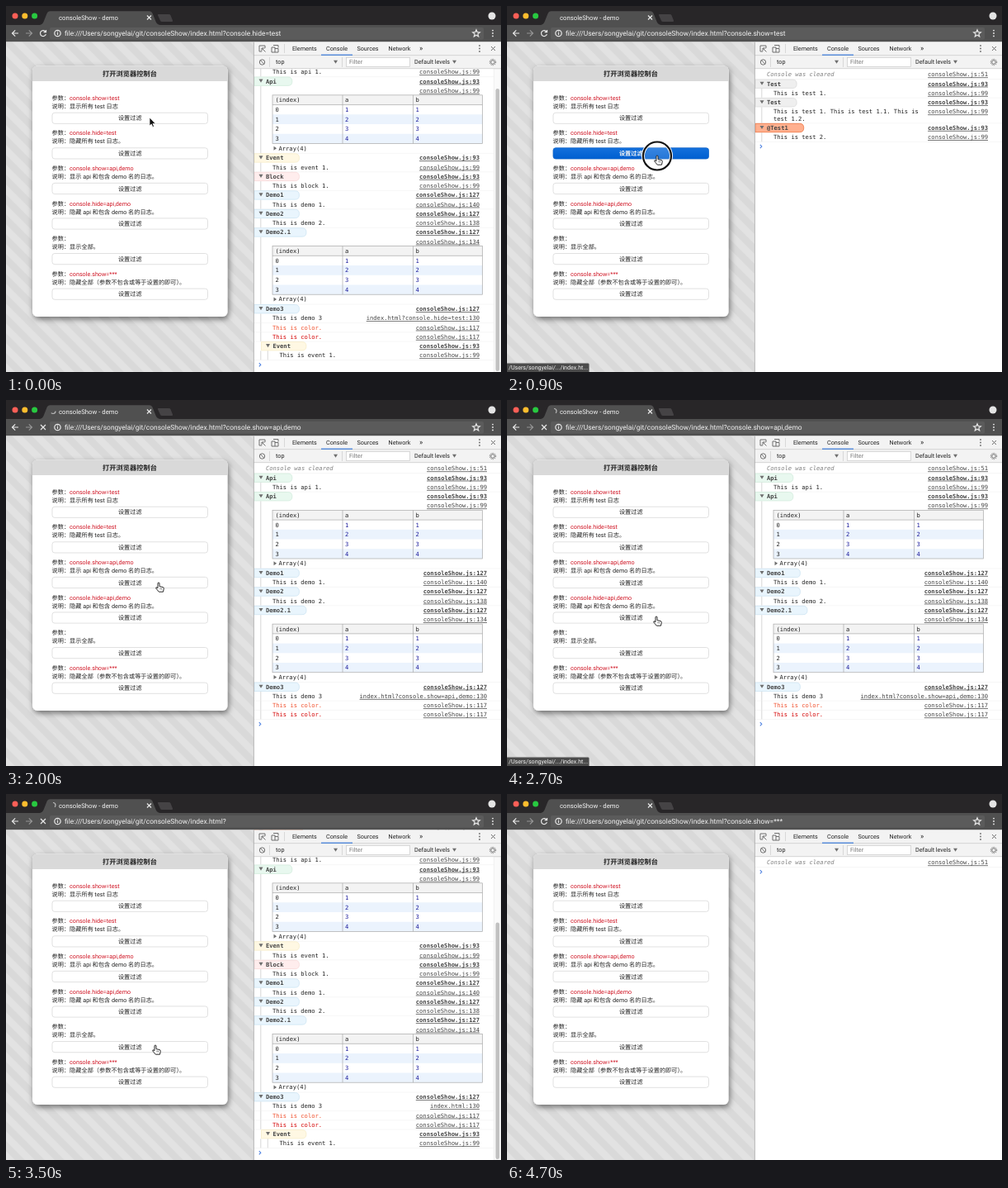
Recreate the animation shown at these times as an HTML page. Size 600 by 443 pixels, loop 4800 ms.

```html
<!DOCTYPE html>
<html lang="zh-CN">
<head>
<meta charset="utf-8">
<title>consoleShow - demo</title>
<style>
  html, body { margin: 0; width: 100%; height: 100%; overflow: hidden; }
  svg { display: block; width: 600px; height: 443px; }
  text { font: 7.2px Roboto, "Noto Sans CJK SC", "Noto Sans CJK", sans-serif; fill: #222; text-rendering: geometricPrecision; white-space: pre; }
  .bold { font-weight: bold; }
  .mid { text-anchor: middle; }
  .light { fill: #f4f4f4; }
  .red { fill: #cf1322; }
  #log text { font: 7.13px "DejaVu Sans Mono", monospace; }
  #log .bold { font-weight: bold; fill: #444; }
  #log .note { font-style: italic; fill: #808080; }
  #log .link { text-anchor: end; text-decoration: underline; fill: #444; }
  #log .num { fill: #1c1c9c; }
  .icon { fill: none; stroke: #e8e8e8; stroke-width: 1.2; }
  .tool { fill: none; stroke: #6e6e6e; stroke-width: 1; }
</style>
</head>
<body>
<svg viewBox="0 0 600 443">
  <defs>
    <pattern id="stripes" width="24" height="24" patternUnits="userSpaceOnUse">
      <path fill="#e2e2e2" d="M0 0h24v24H0z"/>
      <path fill="#d9d9d9" d="M0 0h12l12 12v12zM0 12l12 12H0z"/>
    </pattern>
    <linearGradient id="blue" x2="0" y2="1"><stop stop-color="#1470dc"/><stop offset="1" stop-color="#005fd0"/></linearGradient>
    <filter id="shadow" x="-20%" y="-20%" width="140%" height="140%">
      <feDropShadow dx="1.5" dy="3" stdDeviation="3.5" flood-opacity=".5"/>
    </filter>
  </defs>
  <path fill="#fff" d="M300 43h300v400H300z"/>
  <g id="log"></g>
  <g id="frame"></g>
  <g id="live"></g>
</svg>
<script>
const LOOP = 4800, STEP = 100, ROW = 11.25, TABLE = 81.5, USER = 'songyelai';
const $ = id => document.getElementById(id);
const text = (x, y, s, cls = '', attrs = '') => `<text x="${x}" y="${y}" class="${cls}" ${attrs}>${s}</text>`;
const path = (d, attrs) => `<path d="${d}" ${attrs}/>`;
const rect = (x, y, w, h, attrs) => `<rect x="${x}" y="${y}" width="${w}" height="${h}" ${attrs}/>`;
const dot = (x, y, r, attrs) => `<circle cx="${x}" cy="${y}" r="${r}" ${attrs}/>`;
const icon = d => path(d, 'class="icon"');
const tool = d => path(d, 'class="tool"');

const visits = [
  { hover: 100, press: 100, load: 200, commit: 300, done: 300, button: 0, query: 'show=test' },
  { hover: 800, press: 900, load: 1000, commit: 1000, done: 1100, button: 1, query: 'hide=test' },
  { hover: 1500, press: 1800, load: 1900, commit: 2000, done: 2100, button: 2, query: 'show=api,demo' },
  { hover: 2500, press: 2600, load: 2700, commit: 2800, done: 2900, button: 3, query: 'hide=api,demo' },
  { hover: 3100, press: 3300, load: 3400, commit: 3500, done: 3600, button: 4, query: '' },
  { hover: 4000, press: 4200, load: 4300, commit: 4400, done: 4600, button: 5, query: 'show=***' },
];
const notes = ['显示所有 test 日志', '隐藏所有 test 日志。', '显示 api 和包含 demo 名的日志。',
  '隐藏 api 和包含 demo 名的日志。', '显示全部。', '隐藏全部（参数不包含或等于设置的即可）。'];
const moves = [[0, 174, 135], [400, 174, 135], [700, 183, 178], [900, 182, 181], [1100, 182, 181],
  [1500, 185, 221], [2200, 185, 221], [2500, 181, 262], [2800, 181, 262], [3100, 181, 304],
  [3600, 181, 304], [3800, 178, 347], [4500, 178, 347], [4600, 184, 351], [4800, 184, 351]];

// Each group: filter keys, label, messages as [text, line, colour]
const groups = [
  ['test', 'Test', ['This is test 1.', 99]],
  ['test', 'Test', ['This is test 1. This is test 1.1. This is\ntest 1.2.', 99]],
  ['test', '@Test1', ['This is test 2.', 99]],
  ['api', 'Api', ['This is api 1.', 99]],
  ['api', 'Api', ['table', 99]],
  ['event', 'Event', ['This is event 1.', 99]],
  ['block', 'Block', ['This is block 1.', 99]],
  ['demo', 'Demo1', ['This is demo 1.', 140]],
  ['demo', 'Demo2', ['This is demo 2.', 138]],
  ['demo', 'Demo2.1', ['table', 134]],
  ['demo', 'Demo3', ['This is demo 3', 130], ['This is color.', 117, '#f0502d'], ['This is color.', 117, '#d40000']],
  ['demo event', 'Event', ['This is event 1.', 99]],
];
const tints = {
  test: ['#efefef', '#dcdcdc'], api: ['#e8f8ef', '#d3ecdd'], event: ['#fff8e3', '#f6ecc9'],
  block: ['#ffeded', '#f8dada'], demo: ['#e9f5fd', '#cfe5f3'], '@Test1': ['#ffb08f', '#ee7440'],
};

const buttonTop = i => 129.2 + 42.58 * i;
const button = (i, pressed) =>
  rect(56, buttonTop(i), 188.5, 13.2, `rx="3" fill="${pressed ? 'url(#blue)' : '#fff'}" stroke="${pressed ? '#0a62cc' : '#d4d4d4'}" stroke-width=".7"`) +
  text(150.3, buttonTop(i) + 9.2, '设置过滤', pressed ? 'mid bold light' : 'mid');

function browserBars() {
  const lights = ['#ff5f57', '#ffbd2e', '#28c940'].map((c, i) => dot(11 + 11.8 * i, 12, 3.5, `fill="${c}"`)).join('');
  const menu = (x, y, gap, fill) => [-1, 0, 1].map(i => dot(x, y + i * gap, .9, `fill="${fill}"`)).join('');
  return rect(0, 0, 600, 23, 'fill="#282628"') + rect(0, 23, 600, 20.5, 'fill="#505050"') + lights +
    path('M40 23.2q4-.5 5.500-4l4-10q1.200-3 4-3h120q3 0 4.200 3l4 10q1.500 3.500 6 4z', 'fill="#505050"') +
    path('M184.500 10h13q1.500 0 2 1.200l2.500 6.300q.5 1.500-1 1.500h-12q-1.500 0-2-1.200l-3-6.500q-.4-1.200.5-1.300z', 'fill="#454345"') +
    text(64, 16.6, 'consoleShow - demo', 'light', 'style="font-size:7.76px"') +
    icon('M171 11.500l5 5m0-5l-5 5') + dot(589, 12, 4.5, 'fill="#e4e4e4"') +
    rect(53, 26, 526, 14.5, 'rx="2" fill="#5b5b5b"') +
    icon('M15 33H7.500m3.700-3.700L7.500 33l3.700 3.700') +
    path('M24 33h7.500m-3.700-3.700l3.700 3.700-3.700 3.700', 'class="icon" opacity=".45"') +
    dot(62.5, 33, 3.7, 'class="icon" stroke-width="1"') + icon('M62.500 32.300v2.800m0-4.700v1') +
    icon('M570 28.800l1.200 2.900 3.100.2-2.400 2 .8 3.100-2.700-1.700-2.700 1.700.8-3.100-2.400-2 3.100-.2z') +
    menu(590, 33, 3.4, '#eee');
}

function demoPage() {
  const items = notes.map((note, i) => {
    const y = 113.8 + 42.58 * i, { query } = visits[i];
    return text(55.5, y, `参数：<tspan class="red">${query && 'console.' + query}</tspan>`) +
      text(55.5, y + 10, '说明：' + note) + button(i);
  }).join('');
  return rect(0, 43.5, 300, 399.5, 'fill="url(#stripes)"') +
    rect(32, 72.5, 236.5, 303.5, 'rx="6" fill="#fff" filter="url(#shadow)"') +
    path('M32 91V78.500q0-6 6-6h224.500q6 0 6 6V91z', 'fill="#d9d9d9"') +
    text(150, 85.4, '打开浏览器控制台', 'mid bold', 'style="font-size:8.25px"') + items;
}

function toolsBars() {
  const tabs = [[347, 'Elements'], [388, 'Console'], [425.5, 'Sources'], [463.5, 'Network']];
  const teeth = 'class="tool" stroke-width="1.300" stroke-dasharray="1.200 1.160"';
  return rect(300, 43.5, 300, 32.3, 'fill="#f3f3f3"') +
    path('M300 59.700h300M300 75.700h300', 'stroke="#ccc" stroke-width=".8"') +
    path('M300.400 43.500V443', 'stroke="#a8a8a8" stroke-width=".8"') +
    tabs.map(([x, s]) => text(x, 54.1, s)).join('') + rect(382, 58.6, 38, 1.2, 'fill="#3879d9"') +
    tool('M310 55h-3v-7h7v3M310 51l4.500 4.500M310 51v3.500m0-3.500h3.500') +
    tool('M324 47.500h6v3M322 50h4v6h-4zM326 56h4v-4.500h-4') +
    path('M337.500 46v11M319.500 62v12M407.500 62v12', 'stroke="#ccc" stroke-width=".7"') +
    text(501, 54, '»', '', 'style="font-size:9px"') +
    [48, 51.5, 55].map(y => dot(574, y, .9, 'fill="#6e6e6e"')).join('') + tool('M588 49l5 5m0-5l-5 5') +
    dot(310.5, 68, 3.2, 'class="tool"') + tool('M308.300 65.700l4.500 4.500') +
    text(327, 70.3, 'top') + path('M397 65.800h5l-2.500 4z', 'fill="#6e6e6e"') +
    rect(412.5, 62.3, 77, 11, 'fill="#fff" stroke="#c8c8c8" stroke-width=".7"') +
    text(416, 70.3, 'Filter', '', 'style="fill:#777"') +
    text(495, 70.3, 'Default levels') + path('M541 65.800h5l-2.500 4z', 'fill="#6e6e6e"') +
    dot(590, 68, 2.3, 'class="tool" stroke-width="1.500"') + dot(590, 68, 3.7, teeth);
}

function table(top) {
  const h = 11.72, line = 'stroke="#aaa" stroke-width=".7" fill="none"';
  const cells = (y, values, cls) => [326.5, 411, 496.5].map((x, i) => text(x, y + 8.4, values[i], i ? cls : '')).join('');
  let out = rect(323, top, 254.5, h, 'fill="#f3f3f3"') + cells(top, ['(index)', 'a', 'b'], '');
  for (let i = 0; i < 4; i++) {
    const y = top + h * (i + 1);
    if (i % 2) out += rect(323, y, 254.5, h, 'fill="#ebf3fd"');
    out += cells(y, [i, i + 1, i + 1], 'num');
  }
  return out + rect(323, top, 254.5, h * 5, line) + path(`M323 ${top + h}h254.500M408 ${top}v${h * 5}M493.500 ${top}v${h * 5}`, line) +
    path(`M324.500 ${top + 61.800}v5l3.600-2.500z`, 'fill="#6e6e6e"') + text(330.5, top + 66.8, 'Array(4)');
}

function visibleGroups(query) {
  const [mode, names = ''] = query.split('='), wanted = names.split(',');
  return groups.filter(([keys]) => !mode || (mode === 'show'
    ? keys.split(' ').every(k => wanted.includes(k))
    : !keys.split(' ').some(k => wanted.includes(k))));
}
const messageHeight = s => s === 'table' ? TABLE : s.includes('\n') ? 19.5 : ROW;

function consoleLog(query) {
  const shown = visibleGroups(query);
  const end = 77.4 + ROW + shown.reduce((sum, [, , ...msgs]) => sum + ROW + msgs.reduce((s, m) => s + messageHeight(m[0]), 0), 0);
  const shift = Math.min(0, 428.6 - end), right = shift ? 574 : 583;
  const page = 'index.html' + (query && '?console.' + query);
  const link = (y, line, cls = '') => text(right, y + 8, (line === 130 ? page : 'consoleShow.js') + ':' + line, 'link ' + cls);
  const rule = y => path(`M300 ${y}H${shift ? 591 : 600}`, 'stroke="#f0f0f0" stroke-width=".6"');
  let y = 77.4 + shift;
  let out = text(315, y + 8, 'Console was cleared', 'note') + link(y, 51) + rule(y + ROW);
  y += ROW;
  for (const [keys, label, ...messages] of shown) {
    const path2 = keys.split(' '), indent = 8.5 * (path2.length - 1);
    const [fill, edge] = tints[label] || tints[path2.at(-1)];
    const tip = 334 + indent + label.length * 4.29;
    const markers = h => [0, 8.5].filter(x => x <= indent).map(x => path(`M${308.800 + x} ${y}v${h}`, 'stroke="#c8c8c8" stroke-width=".7"')).join('');
    out += path(`M${301 + indent} ${y + .4}H${tip - 5}q5 0 5 5.200t-5 5.200H${301 + indent}z`, `fill="${fill}" stroke="${edge}" stroke-width=".8"`) +
      path(`M${306.500 + indent} ${y + 3}h5l-2.500 4.200z`, 'fill="#6e6e6e"') +
      text(315 + indent, y + 8, label, 'bold') + link(y, path2[0] === 'demo' && !indent ? 127 : 93, 'bold');
    y += ROW;
    for (const [s, line, color = '#222'] of messages) {
      const h = messageHeight(s);
      out += markers(h) + link(y, line) + rule(y + h);
      out += s === 'table' ? table(y + 11) : s.split('\n').map((part, i) =>
        text(323 + indent, y + 8 + 8.6 * i, part, '', `style="fill:${color}"`)).join('');
      y += h;
    }
  }
  out += path(`M306.800 ${y + 3.400}l2 2.200-2 2.200`, 'fill="none" stroke="#4a7fe0" stroke-width="1.100"');
  if (shift) {
    const view = 367, thumb = view * view / (view - shift);
    out += rect(591.5, 76, 8.5, view, 'fill="#fafafa" stroke="#e8e8e8" stroke-width=".6"') +
      rect(593.5, 443 - thumb, 4.6, thumb - 1, 'rx="2.300" fill="#c1c1c1"');
  }
  return out;
}

function pointerAt(t) {
  const i = moves.findIndex(m => m[0] > t), [t0, x0, y0] = moves[i - 1], [t1, x1, y1] = moves[i];
  const p = (t - t0) / (t1 - t0), e = p * p * (3 - 2 * p);
  return [x0 + (x1 - x0) * e, y0 + (y1 - y0) * e];
}

function pointer(t, pressed) {
  const [x, y] = pointerAt(t);
  const onButton = t > 0 && notes.some((_, i) => y >= buttonTop(i) && y <= buttonTop(i) + 13.2);
  const shape = onButton
    ? path('M-1 1a1 1 0 0 1 2 0v3.600l4 .9q1.500.4 1.300 1.900l-.8 3.800H.3L-3 7.200q-.8-1.700.9-1.400l1.100.9z', 'fill="#fff" stroke="#111" stroke-width=".9"') +
      path('M2 6.500v1.800m1.700-1.500v1.600', 'stroke="#111" stroke-width=".6"')
    : path('M0 0v10l2.300-2 1.500 3.400 1.700-.7-1.500-3.300h3.200z', 'fill="#111" stroke="#fff" stroke-width=".7"');
  const ring = dot(0, .5, 17, 'fill="#fff" fill-opacity=".15" stroke="#fff" stroke-width="4"') +
    dot(0, .5, 17, 'fill="none" stroke="#111" stroke-width="2.200"');
  return `<g transform="translate(${x} ${y})">${pressed ? ring : ''}${shape}</g>`;
}

function statusBar(html) {
  return rect(-1, 432.4, 100.5, 11.6, 'rx="1.500" fill="#4b4b4b" stroke="#8a8a8a" stroke-width=".6"') +
    text(2, 440.2, `/Users/${USER}/.../${html}`, 'light', 'style="font-size:7.1px"');
}

function render(t) {
  const query = (visits.findLast(v => v.commit <= t) || { query: 'hide=test' }).query;
  const pressed = visits.find(v => v.press <= t && t < v.load);
  const loading = visits.some(v => v.load <= t && t < v.done);
  const hovered = visits.find(v => v.hover <= t && t < v.commit);
  $('log').innerHTML = consoleLog(query);
  $('live').innerHTML =
    (loading
      ? icon('M42 30l6 6m0-6l-6 6') + dot(57, 13.5, 3, `class="icon" stroke-dasharray="7 12" opacity=".7" transform="rotate(${t * .9} 57 13.500)"`)
      : icon('M47.700 30.800a3.500 3.500 0 1 0 .7 3.300M48.500 29v2.600h-2.800')) +
    text(71, 36, `file:///Users/${USER}/git/consoleShow/index.html?${query && 'console.' + query}`, 'light', 'style="font-size:8.43px"') +
    (pressed ? button(pressed.button, true) : '') +
    (hovered ? statusBar(hovered.query ? 'index.ht...' : 'index.html') : '') +
    (t < 4700 ? pointer(t, pressed) : '');
}

$('frame').innerHTML = browserBars() + demoPage() + toolsBars();
let last = -1;
function tick() {
  const t = Math.floor(performance.now() % LOOP / STEP) * STEP;
  if (t !== last) render(last = t);
  requestAnimationFrame(tick);
}
tick();
</script>
</body>
</html>
```
